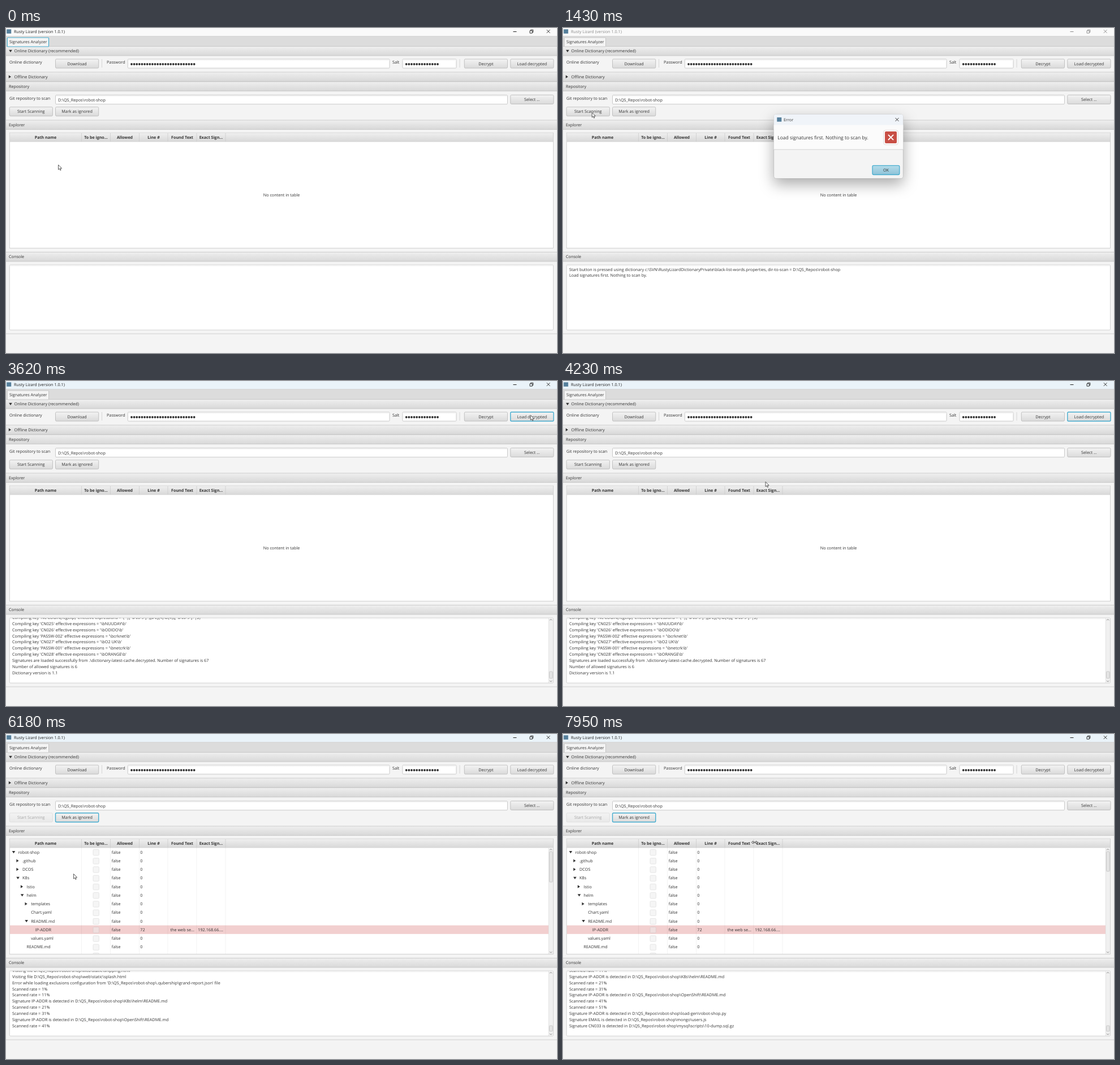
An HTML page that plays this animation: 974x575 px, repeating every 8000 ms.

```html
<!DOCTYPE html>
<html lang="en">
<head>
<meta charset="utf-8">
<title>Signatures Analyzer</title>
<style>
html, body { margin: 0; width: 100%; height: 100%; overflow: hidden; background: #f4f4f4 }
svg { display: block; width: 100vw; height: 100vh }
text { font: 7.25px "Open Sans", "Noto Sans", sans-serif; fill: #333; white-space: pre; text-rendering: geometricPrecision }
.mid { text-anchor: middle }
.head { font-weight: 700; font-size: 7.1px; text-anchor: middle }
.big { font-size: 8.47px }
.dialog { filter: drop-shadow(0 10px 13px #0005) }
</style>
</head>
<body>
<svg viewBox="0 0 974 575">
  <defs id="defs"></defs>
  <g id="base"></g>
  <g id="live"></g>
</svg>
<script>
const LOOP = 8000, LINE = 10.83, ROW = 15.25;
const COLS = [133.5, 184.5, 235.5, 286, 337, 388];
const $ = id => document.getElementById(id);

// Drawing helpers: each returns SVG markup
const rect = (x, y, w, h, fill, more = '') =>
  `<rect x="${x}" y="${y}" width="${w}" height="${h}" fill="${fill}" ${more}/>`;
const path = (d, stroke = '#333', more = '') => `<path d="${d}" fill="none" stroke="${stroke}" ${more}/>`;
const text = (x, y, s, cls = '', more = '') => `<text x="${x}" y="${y + 2.5}" class="${cls}" ${more}>${s}</text>`;
const edge = (color, r = 1.5, w = .8) => `stroke="${color}" stroke-width="${w}" rx="${r}"`;
const hline = (y, color = '#c3c3c3') => path(`M0 ${y}H974`, color, 'stroke-width=".8"');
const gradient = (id, a, b) => `<linearGradient id="${id}" x2="0" y2="1"><stop stop-color="${a}"/>` +
  `<stop offset="1" stop-color="${b}"/></linearGradient>`;
const clip = (id, x, y, w, h) => `<clipPath id="${id}">${rect(x, y, w, h, '#000')}</clipPath>`;
const arrow = (x, y, open) =>
  `<path d="M${x} ${y}${open ? 'm-2.8-2h5.6l-2.8 4.2z' : 'm-2-2.8v5.6l4.2-2.8z'}" fill="#333"/>`;
const ramp = (t, a, b) => Math.min(1, Math.max(0, (t - a) / (b - a)));

$('defs').innerHTML = gradient('bar', '#efefef', '#d8d8d8') + gradient('btn', '#f3f3f3', '#dadada') +
  gradient('blue', '#b4dcea', '#8fc3d8') + gradient('blueHot', '#c4e6f2', '#a0d0e2') +
  gradient('field', '#eee', '#fff') + clip('log', 7, 419.5, 951, 114) + clip('rows', 7, 201, 960, 188);

const panel = (y, title, state) => rect(0, y, 974, 16.5, 'url(#bar)') + hline(y) + hline(y + 16.5) +
  (state === undefined ? '' : arrow(state ? 8 : 6.8, y + 8.3, state)) +
  text(state === undefined ? 5 : 14.5, y + 8, title);
const field = (x, y, w) => rect(x, y, w, 16, '#fff', edge('#bdbdbd')) + rect(x + .5, y + .5, w - 1, 3, 'url(#field)');
const dots = (x, n) => Array.from({ length: n }, (_, i) =>
  `<circle cx="${x + i * 4.61}" cy="64" r="1.9" fill="#333"/>`).join('');
const cross = (x, y, r, color, w) => path(`M${x - r} ${y - r}l${2 * r} ${2 * r}m0 ${-2 * r}l${-2 * r} ${2 * r}`, color, `stroke-width="${w}"`);

$('base').innerHTML =
  rect(0, 14, 974, 19, '#dcdcdc') + hline(14, '#cfcfcf') +
  panel(32.5, 'Online Dictionary (recommended)', true) +
  text(6, 60.5, 'Online dictionary') + text(178, 60.5, 'Password') + text(683, 60.5, 'Salt') +
  path('M169.5 55v15M802 55v15', '#cfcfcf', 'stroke-width=".8"') +
  field(215.3, 55, 462.7) + dots(222, 25) + field(701, 55, 95) + dots(707.7, 13) +
  panel(78, 'Offline Dictionary', false) +
  panel(95, 'Repository') + text(6, 124, 'Git repository to scan') +
  field(87.5, 118.7, 799) + text(92, 127, 'D:\\QS_Repos\\robot-shop') +
  panel(163, 'Explorer') +
  rect(6.3, 185.3, 961.2, 204.2, '#fff', edge('#c8c8c8', 0)) +
  rect(6.8, 185.8, 960.2, 15.4, 'url(#bar)') + path('M6.5 201.2H967', '#cdcdcd', 'stroke-width=".5"') +
  path(COLS.map(x => `M${x} 186v15`).join(''), '#c9c9c9', 'stroke-width=".7"') +
  ['Path name', 'To be igno...', 'Allowed', 'Line #', 'Found Text', 'Exact Sign...']
    .map((s, i) => text([70, 159, 210, 261, 311.5, 362.5][i], 193.5, s, 'head')).join('') +
  panel(396.5, 'Console') +
  rect(6.3, 419, 961.2, 115.3, '#fff', edge('#c8c8c8')) + rect(6.8, 419.4, 960.2, 3, 'url(#field)') +
  hline(541);

// Console log: [time shown, text]
const raw = String.raw, REPO = raw`D:\QS_Repos\robot-shop`;
const START = raw`Start button is pressed using dictionary c:\SVN\RustyLizardDictionaryPrivate\black-list-words.properties, dir-to-scan = ` + REPO;
const log = [[960, START], [960, 'Load signatures first. Nothing to scan by.']];
const add = (t, s) => log.push([t, s]);
[
  ['NC-LOGIN(regexp)', raw`(^|[^a-z0-9-]+)[a-z]{4}\d{4}([^a-z0-9-]+|$)`],
  ['CN025', raw`\bNUUDAY\b`], ['CN026', raw`\bODIDO\b`], ['PASSW-002', raw`\bcrknet\b`],
  ['CN027', raw`\bO2 UK\b`], ['PASSW-001', raw`\bnetcrk\b`], ['CN028', raw`\bORANGE\b`]
].forEach(([key, re]) => add(3620, `Compiling key '${key}' effective expressions = '${re}'`));
add(3620, raw`Signatures are loaded successfully from .\dictionary-latest-cache.decrypted. Number of signatures is 67`);
add(3620, 'Number of allowed signatures is 6');
add(3620, 'Dictionary version is 1.1');
add(4900, START);
('Dockerfile default.conf.template entrypoint.sh static/ static/cart.html static/css/ static/css/style.css ' +
 'static/empty.html static/eum-tmpl.html static/index.html static/js/ static/js/controller.js static/login.html ' +
 'static/media/ static/media/graph.png static/media/instana_icon_square.png static/media/stan.png ' +
 'static/payment.html static/product.html static/search.html static/shipping.html static/splash.html')
  .split(' ').forEach((f, i, all) => add(4960 + 420 * i / (all.length - 1),
    `Visiting ${f.endsWith('/') ? 'directory' : 'file'} ${REPO}\\web\\${f.replace(/\/$/, '').replaceAll('/', '\\')}`));
const rate = (t, n) => add(t, `Scanned rate = ${n}%`);
const found = (t, key, file) => add(t, `Signature ${key} is detected in ${REPO}\\${file}`);
add(5465, `Error while loading exclusions configuration from '${REPO}\\.qubership\\grand-report.json' file`);
rate(5520, 1);
rate(5590, 11);
found(5650, 'IP-ADDR', raw`K8s\helm\README.md`);
rate(5780, 21);
rate(5910, 31);
found(6050, 'IP-ADDR', raw`OpenShift\README.md`);
rate(6120, 41);
rate(6650, 51);
found(6900, 'IP-ADDR', raw`load-gen\robot-shop.py`);
found(7150, 'EMAIL', raw`mongo\users.js`);
found(7400, 'CN033', raw`mysql\scripts\10-dump.sql.gz`);

// Tree rows: depth, name, arrow state (1 open, 0 closed)
const tree = [
  [0, 'robot-shop', 1], [1, '.github', 0], [1, 'DCOS', 0], [1, 'K8s', 1], [2, 'Istio', 0], [2, 'helm', 1],
  [3, 'templates', 0], [3, 'Chart.yaml'], [3, 'README.md', 1], [4, 'IP-ADDR'], [3, 'values.yaml'],
  [2, 'README.md'], [2, 'autoscale.sh']
];

// Pointer keys: time, x, y, easing into the key
const ease = { s: p => p * p * (3 - 2 * p), i: p => p * p, o: p => p * (2 - p), l: p => p };
const keys = [
  [70, 92.5, 242], [820, 51.3, 149.5, 's'], [1750, 51.3, 149.5, 'l'], [2520, 565, 247, 's'],
  [2620, 565, 247, 'l'], [2800, 751, 111, 'i'], [3420, 927.3, 60.5, 'o'], [4020, 927.3, 60.5, 'l'],
  [4220, 358, 178.3, 'i'], [4350, 358, 178.3, 'l'], [4490, 48, 198, 'o'], [4780, 18.3, 145.5, 's'],
  [5460, 18.3, 145.5, 'l'], [5770, 12, 206, 's'], [5880, 12, 206, 'l'], [6180, 119.5, 247.5, 's'],
  [6310, 122, 248, 'o'], [6640, 122, 248, 'l'], [7430, 287, 194, 's'], [7920, 338.7, 191.7, 's']
];
function pointer(t) {
  const i = keys.findIndex(k => k[0] > t);
  if (i <= 0) return (i ? keys[keys.length - 1] : keys[0]).slice(1, 3);
  const a = keys[i - 1], b = keys[i], p = ease[b[3]](ramp(t, a[0], b[0]));
  return [a[1] + (b[1] - a[1]) * p, a[2] + (b[2] - a[2]) * p];
}

const titleBar = t => {
  const active = ramp(t, 70, 220) - ramp(t, 1000, 1150) + ramp(t, 2620, 2770);
  const ink = t > 1000 && t < 2620 ? '#8a8a8a' : '#222';
  return rect(0, 0, 974, 14, '#fafafa') + rect(0, 0, 974, 14, '#eaf3f9', `opacity="${active}"`) +
    rect(1.2, 2.3, 8, 7.5, '#557f9b') + text(14, 6.5, 'Rusty Lizard (version 1.0.1)', '', `style="fill:${ink}"`) +
    path('M896.5 6.5h6', ink) +
    path('M926 4.8h4.3v4.3h-4.3zM927.5 4.5v-1.3h4.3v4.3h-1.3', ink, 'stroke-width=".9"') + cross(958.7, 6, 2.9, ink, .9);
};

const tab = on => rect(2.3, 17, 73.2, 16, '#f4f4f4', edge(on ? '#45acce' : '#bdbdbd', 1, on ? 1.2 : .8)) +
  text(6, 24.5, 'Signatures Analyzer');

function buttons(t, focus) {
  return [['Download', 87.5, 55], ['Decrypt', 810.3, 55], ['Load decrypted', 891.8, 55], ['Select ...', 891.8, 118.5],
    ['Start Scanning', 6.2, 139.8], ['Mark as ignored', 87.5, 139.8]].map(([label, x, y]) => {
    const off = label === 'Start Scanning' && t >= 4840, on = label === focus;
    return `<g opacity="${off ? .4 : 1}">` + rect(x, y, 76.2, 16, 'url(#btn)',
      edge(on ? '#45acce' : '#b5b5b5', 1.8, on ? 1.4 : .8)) + text(x + 38.1, y + 8, label, 'mid') + '</g>';
  }).join('');
}

const scrollBar = (y, h, top, size) => rect(959.3, y, 7.8, h, '#f0f0f0') + path(`M959.3 ${y}v${h}`, '#d5d5d5', 'stroke-width=".6"') +
  rect(960.5, top, 5.8, size, '#e4e4e4', edge('#bcbcbc', 1.5, .7)) +
  path(`M961 ${y + 3.8}l2.2-1.8 2.2 1.8M961 ${y + h - 3.8}l2.2 1.8 2.2-1.8`, '#777', 'stroke-width=".8"');

function table(t) {
  if (t < 4950) return text(487, 295, 'No content in table', 'mid');
  const open = t >= 5850;
  const rows = (open ? tree : [[0, 'robot-shop', 0]]).map(([depth, name, state], i) => {
    const y = 209 + i * ROW, x = 21.5 + depth * 7.55, hit = name === 'IP-ADDR';
    return (hit ? rect(7, y - 7.7, 952, ROW, '#f2cfcf') : '') +
      (state === undefined ? '' : arrow(x - (state ? 8 : 8.7), y, state)) + text(x, y, name) +
      rect(154, y - 4.7, 10.4, 10.4, '#ededed', edge('#c4c4c4', 1.5) + ' opacity=".5"') +
      text(186.8, y, 'false') + text(237.3, y, hit ? 72 : 0) +
      (hit ? text(290.5, y, 'the web se...') + text(339.3, y, '192.168.66....') : '');
  }).join('');
  return `<g clip-path="url(#rows)">${rows}` + path(COLS.map(x => `M${x} 201v189`).join(''), '#0001', 'stroke-width=".8"') +
    (open ? scrollBar(201.5, 187.5, 208, t < 6700 ? 54 : 35) : '') + '</g>';
}

function consoleLog(t) {
  const count = log.filter(l => l[0] <= t).length, full = count > 9;
  const y0 = full ? 516 - LINE * (count - 1) : 427, from = Math.max(0, count - 10);
  return '<g clip-path="url(#log)">' +
    log.slice(from, count).map((l, i) => text(11, y0 + LINE * (from + i), l[1])).join('') + '</g>' +
    (full ? scrollBar(419.5, 114.5, t < 5000 ? 514 : 516, t < 5000 ? 12 : 10) : '');
}

function dialog(t, mouse) {
  const a = Math.min(ramp(t, 1000, 1220), 1 - ramp(t, 2620, 2820)), s = .95 + .05 * a;
  if (!a) return '';
  const hot = mouse[0] > 547 && mouse[1] > 243;
  return `<g opacity="${a}" transform="translate(452 190) scale(${s}) translate(-452 -190)"><g class="dialog">` +
    rect(372.7, 152.7, 228.6, 113.6, '#f4f4f4', edge('#0003', 4, .7)) + '</g>' +
    rect(372.7, 152.7, 228.6, 30, '#f0f4f9', 'rx="4"') + rect(372.7, 171.5, 228.6, 43.5, '#fbfbfb') +
    path('M373 215h228', '#c6c6c6', 'stroke-width=".8"') +
    rect(378.3, 158.2, 8, 7.5, '#557f9b') + text(390, 162, 'Error') + cross(590.5, 162, 3, '#222', .9) +
    text(379.3, 194.3, 'Load signatures first. Nothing to scan by.', 'big') +
    rect(566.8, 181, 25.4, 25.4, '#fff', edge('#d9cfcd', 3)) + rect(569, 183, 21, 21, '#c84f45', 'rx="2"') +
    cross(579.5, 193.5, 4.6, '#fff', 2) +
    rect(547, 243.3, 47.8, 16.2, `url(#${hot ? 'blueHot' : 'blue'})`, edge('#45acce', 1.8, 1.3)) +
    text(571, 251.5, 'OK', 'mid') + '</g>';
}

function cursor([x, y]) {
  const resize = y < 201 && y > 186 && x > 280 && (Math.abs(x - 286) < 3.5 || Math.abs(x - 337.5) < 3.5);
  const d = resize ? 'M-5.5 0l2.8-2.3v1.6h5.4v-1.6l2.8 2.3-2.8 2.3v-1.6h-5.4v1.6z'
    : 'M0 0v8.6l2-1.8 1.3 3 1.4-.6-1.3-2.9h2.7z';
  return `<path transform="translate(${x} ${y})" d="${d}" fill="#fff" stroke="#333" stroke-width=".8" stroke-linejoin="round"/>`;
}

function focusAt(t) {
  if (t < 950) return 'tab';
  if (t < 1000) return 'Start Scanning';
  if (t < 2640) return '';
  return t >= 3560 && t < 4840 ? 'Load decrypted' : 'Mark as ignored';
}

function draw(now) {
  const t = now % LOOP, mouse = pointer(t), focus = focusAt(t);
  $('live').innerHTML = titleBar(t) + tab(focus === 'tab') + buttons(t, focus) + table(t) +
    consoleLog(t) + dialog(t, mouse) + cursor(mouse);
  requestAnimationFrame(draw);
}
draw(performance.now());
</script>
</body>
</html>
```
